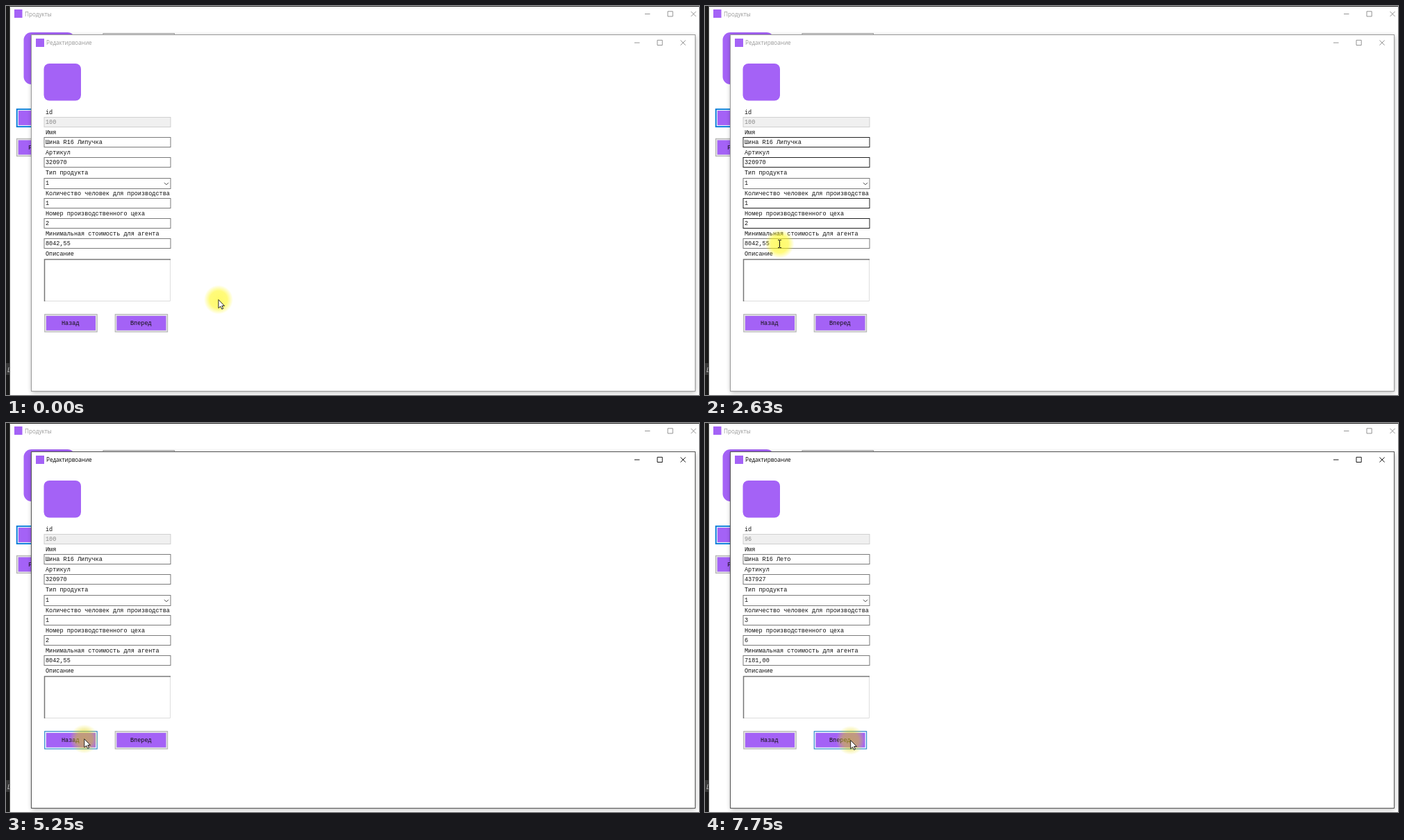
These frames come from a looping animation (998 by 561 pixels, 8000 ms). An HTML page:

```html
<!DOCTYPE html>
<html lang="ru">
<head>
<meta charset="utf-8">
<title>Редактирование</title>
<style>
  html, body { margin: 0; width: 100%; height: 100%; overflow: hidden; background: #fff; }
  svg { display: block; width: 998px; height: 561px; }
  text { white-space: pre; }
  .mono { font: 8.53px "Courier New", "Liberation Mono", monospace; fill: #111; }
  .title { font: 8.15px "Open Sans", "Noto Sans", sans-serif; fill: #999; }
  .purple { fill: #a462f6; }
  .sys { fill: none; stroke: #888; stroke-width: .9; }
  .edit { fill: #fff; stroke: #7a7a7a; stroke-width: 1; }
  .edit.hot { stroke: #222; }
  .edit.off { fill: #f0f0f0; stroke: #d0d0d0; }
  .gray { fill: #888; }
  .outer { fill: #e4e4e4; stroke: #adadad; stroke-width: 1; }
  .hover .outer { fill: #e5f1fb; stroke: #1878c4; }
  .focus .outer { fill: #e5f1fb; stroke: #0078d7; stroke-width: 1.8; }
  #front > .frame { fill: #fff; stroke: #9a9a9a; }
  #front.active > .frame { stroke: #555; }
  #front.active > .title { fill: #000; }
  #front.active > .sys { stroke: #000; }
</style>
</head>
<body>
<svg id="stage" viewBox="0 0 998 561">
  <defs>
    <radialGradient id="bright">
      <stop offset="0" stop-color="#fff700" stop-opacity=".58"/>
      <stop offset=".6" stop-color="#fff700" stop-opacity=".52"/>
      <stop offset="1" stop-color="#fff700" stop-opacity="0"/>
    </radialGradient>
    <radialGradient id="dull">
      <stop offset="0" stop-color="#d7c814" stop-opacity=".58"/>
      <stop offset=".55" stop-color="#dccd14" stop-opacity=".5"/>
      <stop offset="1" stop-color="#f0e614" stop-opacity="0"/>
    </radialGradient>
    <filter id="shadow" x="-5%" y="-5%" width="110%" height="110%">
      <feGaussianBlur stdDeviation="3"/>
    </filter>
  </defs>

  <rect width="998" height="561" fill="#fff"/>
  <rect width="6" height="561" fill="#191919"/>
  <rect y="515" width="6" height="17" fill="#383838"/>
  <text x="2" y="528" font-family="Open Sans, sans-serif" font-size="9" font-style="italic" fill="#ddd">L</text>
  <rect x="5" width="1" height="561" fill="#555"/>
  <rect x="6" width="992" height="1" fill="#222"/>

  <g id="back">
    <rect class="purple" x="12" y="5" width="11.5" height="12"/>
    <text class="title" x="27" y="15">Продукты</text>
    <rect class="purple" x="25.5" y="38" width="74" height="75" rx="11"/>
    <rect class="outer" x="140" y="39.5" width="102.5" height="26"/>
  </g>
  <rect x="37" y="43" width="956" height="514" fill="#000" opacity=".32" filter="url(#shadow)"/>
  <g id="front">
    <rect class="frame" x="36.5" y="41.5" width="956" height="514"/>
    <rect class="purple" x="43" y="47" width="12" height="12"/>
    <text class="title" x="58" y="56">Редактирвоание</text>
    <rect class="purple" x="54.5" y="83" width="53.5" height="53.5" rx="8"/>
  </g>
  <g id="halo"><circle r="21"/></g>
  <path id="arrow" d="M0 0V12.2L2.9 9.6L4.9 13.7L6.8 12.8L4.9 8.9H8.6Z" fill="#fff" stroke="#111" stroke-width=".9"/>
  <path id="beam" d="M-2.4 -5.5H-.6L0 -5L.6 -5.5H2.4M0 -5V5M-2.4 5.5H-.6L0 5L.6 5.5H2.4" fill="none" stroke="#111"/>
</svg>
<script>
const LOOP = 8000;
const $ = id => document.getElementById(id);
const back = $('back'), front = $('front');

function add(parent, tag, attrs, text) {
  const el = document.createElementNS('http://www.w3.org/2000/svg', tag);
  for (const key in attrs) el.setAttribute(key, attrs[key]);
  if (text !== undefined) el.textContent = text;
  return parent.appendChild(el);
}

function windowButtons(parent, x, y) {
  add(parent, 'path', {
    class: 'sys',
    d: `M${x} ${y}h7.5M${x + 33} ${y - 3.7}h7.2v7.2h-7.2zM${x + 66.5} ${y - 3.6}l7.2 7.2m0 -7.2l-7.2 7.2`
  });
}

function button(parent, x, y, label, textX, state = '') {
  const g = add(parent, 'g', { class: state });
  add(g, 'rect', { class: 'outer', x, y, width: 75.5, height: 25.3 });
  add(g, 'rect', { class: 'purple', x: x + 2.2, y: y + 2.2, width: 71.1, height: 20.9 });
  add(g, 'text', { class: 'mono', x: textX, y: y + 15.5 }, label);
  return g;
}

windowButtons(back, 920, 11.5);
windowButtons(front, 905, 53);
button(back, 15.7, 148.8, '', 0, 'focus');
button(back, 15.5, 191.3, 'Редактор', 32.3);

const labels = ['id', 'Имя', 'Артикул', 'Тип продукта', 'Количество человек для производства',
  'Номер производственного цеха', 'Минимальная стоимость для агента', 'Описание'];
const fieldTop = i => 160.5 + 29.17 * i;
const boxes = [], values = [];

labels.forEach((label, i) => {
  add(front, 'text', { class: 'mono', x: 57, y: 155.8 + 29.2 * i }, label);
  if (i === 7) return;
  const y = Math.round(fieldTop(i) - .5) + .5;
  boxes.push(add(front, 'rect', {
    class: i ? 'edit' : 'edit off', x: 55, y, width: 182, height: i === 3 ? 15 : 14
  }));
  values.push(add(front, 'text', { class: i ? 'mono' : 'mono gray', x: 57, y: y + 9.7 }));
});
add(front, 'path', { d: 'M228 254.8l3 3l3 -3', fill: 'none', stroke: '#444' });
add(front, 'path', { d: 'M236.5 365V425.5H55', fill: 'none', stroke: '#ddd' });
add(front, 'path', { d: 'M55.5 426V365.5H237', fill: 'none', stroke: '#777', 'stroke-width': 1.5 });

const prev = button(front, 55.7, 444.7, 'Назад', 80);
const next = button(front, 157.2, 444.7, 'Вперед', 179);

// Time, then the values of each form field
const records = [
  [0, 100, 'Шина R16 Липучка', 320970, 1, 1, 2, '8042,55'],
  [6380, 99, 'Шина R18 Лето', 331576, 1, 2, 4, '5189,00'],
  [6750, 98, 'Шина R17 Зима', 406784, 1, 4, 3, '6453,00'],
  [7250, 97, 'Шина R15 Лето', 389064, 1, 2, 5, '4737,00'],
  [7630, 96, 'Шина R16 Лето', 437927, 1, 3, 6, '7181,00']
];
// Time, pointer x, pointer y
const path = [
  [0, 306, 423.5], [250, 288, 405], [380, 212, 330], [630, 155, 210], [750, 120, 150],
  [1000, 106, 180], [1250, 98, 242], [1380, 92, 300], [1750, 190, 164], [2000, 123, 182.5],
  [2250, 116, 240], [2380, 110, 312], [2630, 107.5, 343], [2750, 109, 386], [3000, 112, 442],
  [3250, 113, 460], [3380, 112, 457], [3630, 111.8, 454.8], [3750, 112.8, 455.7],
  [5380, 221, 455], [5630, 213, 458], [5750, 209.7, 457.6]
];
const stepAt = (list, t) => list.findLast(row => row[0] <= t);
const within = (x, y, left, top, w, h) => x >= left && x <= left + w && y >= top && y <= top + h;

function draw(t) {
  const [, x, y] = stepAt(path, t);
  const [, ...record] = stepAt(records, t);
  const onPrev = within(x, y, 55, 444, 77, 27);
  const onNext = within(x, y, 157, 444, 77, 27);
  const swept = t >= 2380 && t < 2750;
  let overEdit = false;

  record.forEach((value, i) => {
    if (values[i].textContent !== String(value)) values[i].textContent = value;
    const over = i > 0 && i !== 3 && within(x, y, 55, fieldTop(i), 182, 14);
    overEdit ||= over;
    const trail = swept && [1, 2, 4, 5].includes(i);
    boxes[i].classList.toggle('hot', trail || (over && !swept));
  });

  front.setAttribute('class', t >= 3750 ? 'active' : '');
  prev.setAttribute('class', onPrev ? 'hover' : t >= 3750 && t < 6250 ? 'focus' : '');
  next.setAttribute('class', onNext ? 'hover' : '');

  const place = `translate(${x} ${y})`;
  for (const id of ['halo', 'arrow', 'beam']) $(id).setAttribute('transform', place);
  $('halo').setAttribute('fill', `url(#${onPrev || onNext ? 'dull' : 'bright'})`);
  $('arrow').style.display = overEdit ? 'none' : '';
  $('beam').style.display = overEdit ? '' : 'none';
}

const start = performance.now();
function tick() {
  draw((performance.now() - start) % LOOP);
  requestAnimationFrame(tick);
}
draw(0);
requestAnimationFrame(tick);
</script>
</body>
</html>
```
